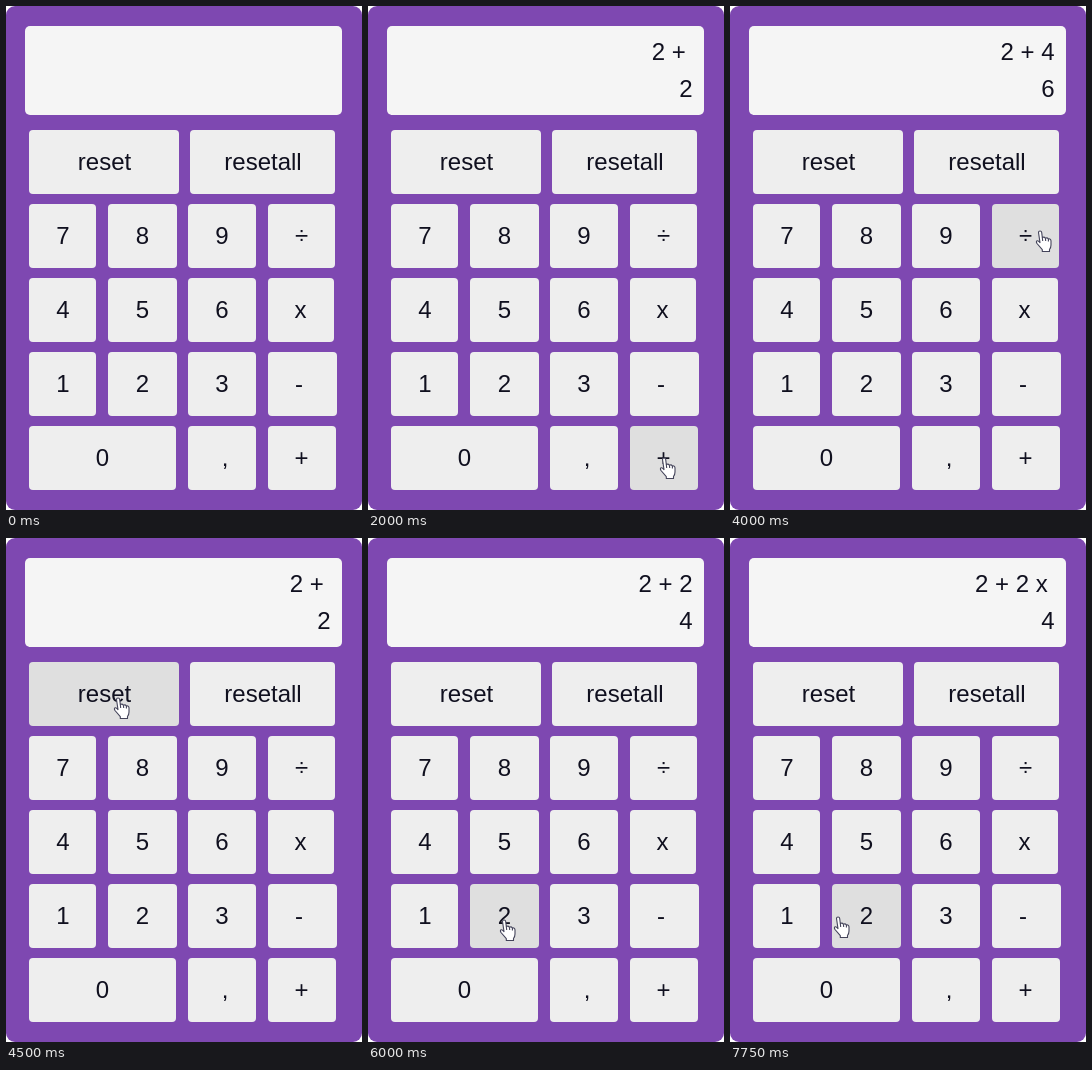
Write an HTML page that moves like this. It is 356 px wide and 504 px high and loops after 8 s.

```html
<!DOCTYPE html>
<html lang="en">
<head>
<meta charset="utf-8">
<title>Calculator</title>
<style>
  html, body { margin: 0; width: 100%; height: 100%; overflow: hidden; background: #fff; }
  svg { display: block; width: 356px; height: 504px; }
  text { font: 24px "Liberation Sans", Arial, sans-serif; fill: #10101f; }
  .key { text-anchor: middle; }
  .out { text-anchor: end; }
</style>
</head>
<body>
<svg id="stage" viewBox="0 0 356 504">
  <rect width="356" height="504" rx="9" fill="#7e48b1"/>
  <rect x="19" y="20" width="317" height="89" rx="5" fill="#f5f5f5"/>
  <text id="sum" class="out" y="54"></text>
  <text id="total" class="out" x="324.5" y="91"></text>
  <g id="keys"></g>
  <g id="cursor" fill="#fff" stroke="#44445a" stroke-width="1.1" stroke-linejoin="round">
    <path id="arrow" d="M0 0V15L3.5 11.8L6 17.5L8.5 16.4L6 10.9H10.5Z"/>
    <g id="hand">
      <path d="M-1.5 1.5Q-1.5 0 0 0Q1.6 0 1.7 1.5L2.3 6.5Q4.3 5.4 5.4 7.2Q7.3 6.2 8.4 8Q10.6 7.4 11 9.8V14Q11 16.5 9.5 18.5V20.5H2.3V18.7L-3 12.5Q-4.3 10.3 -2.8 9.8Q-1.7 9.5 0 11.6Z"/>
      <path d="M2.3 6.5L2.7 10M5.4 7.2L5.7 10M8.4 8V10.5" fill="none"/>
    </g>
  </g>
</svg>
<script>
const NS = "http://www.w3.org/2000/svg";
const get = id => document.getElementById(id);
const LOOP = 8000, STEP = 250, KEY_H = 64;

// label, left, top, right, text centre
const keys = [
  ["reset", 23, 124, 173, 98.5], ["resetall", 184, 124, 329, 257],
  ["7", 23, 198, 90, 57], ["8", 102, 198, 171, 136.5], ["9", 182, 198, 250, 216], ["÷", 262, 198, 329, 295.5],
  ["4", 23, 272, 90, 57], ["5", 102, 272, 171, 136.5], ["6", 182, 272, 250, 216], ["x", 262, 272, 328, 294.5],
  ["1", 23, 346, 90, 57], ["2", 102, 346, 171, 136.5], ["3", 182, 346, 250, 216], ["-", 262, 346, 331, 293],
  ["0", 23, 420, 170, 96.5], [",", 182, 420, 250, 219], ["+", 262, 420, 330, 295.5]
].map(([label, x, y, right, mid]) => {
  const box = add("rect", { x, y, width: right - x, height: KEY_H, rx: 4 });
  add("text", { x: mid, y: y + 40, class: "key" }).textContent = label;
  return { x, y, right, box };
});

// time, x, y of the pointer
const path = [
  [500, 190, 478], [1000, 141, 381], [1250, 141, 381], [1750, 294, 450],
  [2000, 296, 452], [2750, 70, 310], [3250, 70, 310], [4000, 310, 225],
  [4500, 112, 160], [4750, 122, 182], [5000, 163, 270], [5500, 136, 382],
  [6250, 136, 382], [6750, 296, 305], [7000, 296, 305], [7750, 108, 379]
];

// time, expression, result
const readout = [
  [0, "", ""], [1000, "2", "2"], [2000, "2 +", "2"], [2750, "2 + 4", "6"],
  [4500, "2 +", "2"], [5750, "2 + 2", "4"], [7000, "2 + 2 x", "4"]
];

function add(tag, attrs) {
  const el = document.createElementNS(NS, tag);
  for (const name in attrs) el.setAttribute(name, attrs[name]);
  return get("keys").appendChild(el);
}

function pointerAt(t) {
  if (t < path[0][0]) return null;
  const i = path.findIndex(p => p[0] >= t);
  if (i < 1) return path[i < 0 ? path.length - 1 : 0].slice(1);
  const [t0, x0, y0] = path[i - 1], [t1, x1, y1] = path[i];
  const u = (t - t0) / (t1 - t0), e = u * u * (3 - 2 * u);
  return [x0 + (x1 - x0) * e, y0 + (y1 - y0) * e];
}

function show(el, on) {
  el.setAttribute("visibility", on ? "visible" : "hidden");
}

function draw(time) {
  const t = Math.floor((time % LOOP) / STEP) * STEP;
  const [, sum, total] = readout.filter(r => r[0] <= t).pop();
  get("sum").textContent = sum;
  get("sum").setAttribute("x", /[+x]$/.test(sum) ? 317.8 : 324.5);
  get("total").textContent = total;

  const pos = pointerAt(t);
  let over = false;
  for (const k of keys) {
    const hit = pos && pos[0] >= k.x && pos[0] <= k.right && pos[1] >= k.y && pos[1] <= k.y + KEY_H;
    k.box.setAttribute("fill", hit ? "#dfdfdf" : "#eeeeee");
    over = over || hit;
  }
  show(get("hand"), pos && over);
  show(get("arrow"), pos && !over);
  if (pos) get("cursor").setAttribute("transform", `translate(${pos})`);
}

const start = performance.now();
function tick() {
  draw(performance.now() - start);
  requestAnimationFrame(tick);
}
tick();
</script>
</body>
</html>
```
